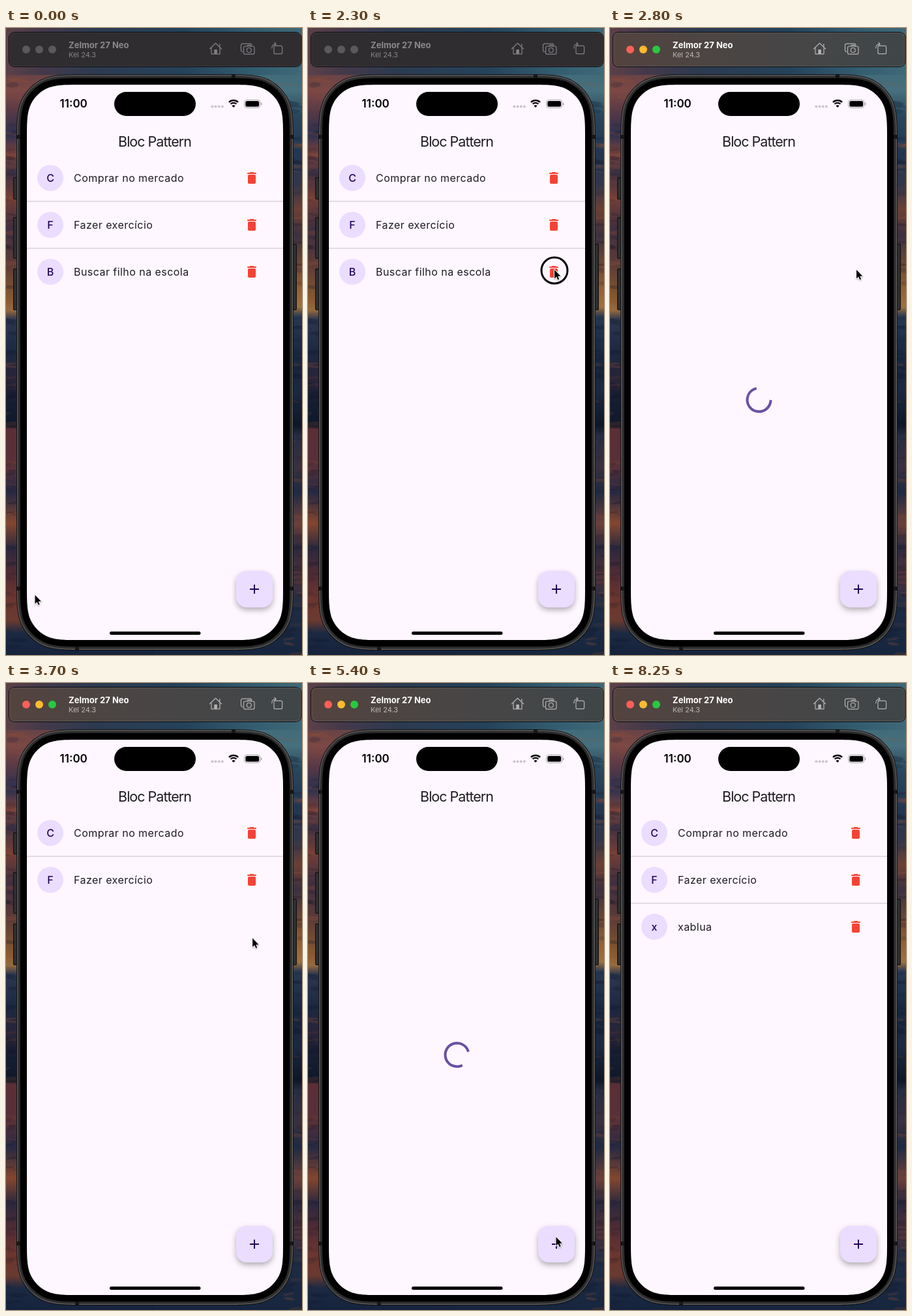
An HTML page with a canvas that plays this animation: 454x962 px, repeating every 8400 ms.

```html
<!DOCTYPE html>
<html lang="pt">
<head>
<meta charset="utf-8">
<title>Bloc Pattern</title>
<style>
html, body { margin: 0; width: 100%; height: 100%; overflow: hidden; background: #1a2236; }
canvas { display: block; width: 100vw; height: 100vh; }
</style>
</head>
<body>
<canvas id="stage" width="454" height="962"></canvas>
<script>
const W = 454, H = 962, LOOP = 8400, STEP = 100;
const canvas = document.getElementById('stage');
let ctx = canvas.getContext('2d');
const FONT = 'Inter, Roboto, sans-serif';

// Time of the main events, in ms
const ACTIVE = 2400, LOAD_MS = 1000;
const loads = [2375, 4710];
const clicks = [[2200, 2400], [4500, 4700]];

const tasks = ['Comprar no mercado', 'Fazer exercício'];

// Pointer keys: time, x, y
const pointer = [
  [0, 44.5, 870], [300, 44.5, 870], [1600, 378, 371], [3600, 378, 371],
  [4400, 380.5, 850], [6300, 380.5, 850], [6400, 380.5, 848],
  [6900, 380.5, 847.5], [7200, 166, 872], [7500, 166, 872], [8100, -16, 874]
];

const trash = new Path2D('M6 19c0 1.1.9 2 2 2h8c1.1 0 2-.9 2-2V9c0-1.1-.9-2-2-2H8c-1.1 0-2 .9-2 2v10z' +
  'M18 4h-2.5l-.71-.71c-.18-.18-.44-.29-.7-.29H9.91c-.26 0-.52.11-.7.29L8.5 4H6c-.55 0-1 .45-1 1s.45 1 1 1h12c.55 0 1-.45 1-1s-.45-1-1-1z');
const arrow = new Path2D('M0 0V13.4L3.1 10.6L5.1 15.2L7.2 14.3L5.2 9.8H9.5Z');

const clamp = v => Math.min(1, Math.max(0, v));
const smooth = v => v * v * (3 - 2 * v);

function seeded(seed) {
  return () => (seed = (seed * 16807) % 2147483647) / 2147483647;
}

function rect(x, y, w, h, r, fill) {
  ctx.beginPath();
  ctx.roundRect(x, y, w, h, r);
  if (fill) { ctx.fillStyle = fill; ctx.fill(); }
}

// Rectangle with continuous-curvature corners
function squircle(x, y, w, h, r, fill) {
  const corners = [[x + w, y, -1, 1, 0], [x + w, y + h, -1, -1, 1],
    [x, y + h, 1, -1, 0], [x, y, 1, 1, 1]];
  ctx.beginPath();
  for (const [cx, cy, sx, sy, swap] of corners) {
    const p = (a, b) => swap ? [cx + sx * b * r, cy + sy * a * r] : [cx + sx * a * r, cy + sy * b * r];
    ctx.lineTo(...p(1.5287, 0));
    ctx.bezierCurveTo(...p(1.0885, 0), ...p(.8684, 0), ...p(.6315, .0749));
    ctx.bezierCurveTo(...p(.3728, .1691), ...p(.1691, .3728), ...p(.0749, .6315));
    ctx.bezierCurveTo(...p(0, .8684), ...p(0, 1.0885), ...p(0, 1.5287));
  }
  ctx.fillStyle = fill;
  ctx.fill();
}

function disc(x, y, r, fill) {
  ctx.beginPath();
  ctx.arc(x, y, r, 0, Math.PI * 2);
  ctx.fillStyle = fill;
  ctx.fill();
}

function line(points) {
  ctx.beginPath();
  points.forEach(([x, y], i) => i ? ctx.lineTo(x, y) : ctx.moveTo(x, y));
  ctx.stroke();
}

function text(str, x, y, size, weight, fill, spacing = 0, align = 'left') {
  ctx.font = `${weight} ${size}px ${FONT}`;
  ctx.letterSpacing = spacing + 'px';
  ctx.textAlign = align;
  ctx.fillStyle = fill;
  ctx.fillText(str, x, y);
  ctx.letterSpacing = '0px';
}

function gradient(x0, y0, x1, y1, stops) {
  const g = ctx.createLinearGradient(x0, y0, x1, y1);
  stops.forEach(([p, c]) => g.addColorStop(p, c));
  return g;
}

function drawWallpaper() {
  const sides = [
    [0, [[0, '#43303c'], [.06, '#5c4048'], [.1, '#7c4844'], [.13, '#5c3a46'], [.17, '#2c3050'],
      [.2, '#80443c'], [.23, '#3a3044'], [.27, '#743e36'], [.32, '#402f40'], [.38, '#5e3c38'],
      [.43, '#86592f'], [.45, '#966a3e'], [.465, '#2c3650'], [.52, '#1c2741'], [.56, '#2a2438'],
      [.6, '#141d33'], [.633, '#10182a'], [.64, '#5c2e36'], [.7, '#56303a'], [.74, '#262842'],
      [.79, '#84462f'], [.83, '#2c283e'], [.87, '#502b34'], [.91, '#6c3530'], [.945, '#6a3a30'],
      [.965, '#1c2942'], [1, '#16233c']]],
    [W / 2, [[0, '#2f4a5c'], [.06, '#3f6878'], [.1, '#47707e'], [.14, '#28465c'], [.2, '#223652'],
      [.25, '#33364a'], [.29, '#6c4034'], [.33, '#3c3040'], [.38, '#724a34'], [.42, '#976434'],
      [.445, '#a0703e'], [.46, '#263852'], [.52, '#182840'], [.58, '#1a2840'], [.633, '#0e1728'],
      [.65, '#262c42'], [.7, '#3a3040'], [.74, '#1e2a42'], [.79, '#6c403a'], [.83, '#2a283e'],
      [.87, '#50323a'], [.92, '#1e2c44'], [1, '#16263e']]]
  ];
  for (const [x, stops] of sides) {
    ctx.fillStyle = gradient(0, 0, 0, H, stops);
    ctx.fillRect(x, 0, W / 2, H);
  }
  ctx.fillStyle = gradient(0, 0, W, 0, [[0, '#5c4048'], [.12, '#44394a'], [.3, '#2c3a50'],
    [.6, '#24425a'], [.85, '#345e70'], [1, '#3f6878']]);
  ctx.fillRect(0, 0, W, 72);

  // Cloud streaks
  const rnd = seeded(37);
  const tones = ['16,22,42', '150,78,50', '14,20,38'];
  for (let i = 0; i < 150; i++) {
    const x = (i % 2 ? W - 10 : 8) + (rnd() - .5) * 30;
    const y = 75 + rnd() * (H - 75);
    ctx.beginPath();
    ctx.ellipse(x, y, 8 + rnd() * 14, 1 + rnd() * 3, (rnd() - .5) * .4, 0, 7);
    ctx.fillStyle = `rgba(${tones[i % 3]},${.1 + rnd() * .2})`;
    ctx.fill();
  }
}

function drawPhone() {
  const buttons = [[11, 229, 34], [11, 290, 64], [11, 369, 64], [440, 331, 102]];
  for (const [x, y, h] of buttons) {
    rect(x, y, 6, h, 2, '#0d0d0e');
    rect(x + 1, y + 1, 4, h - 2, 1.5, '#302f31');
  }
  // Shells from the outer rim to the screen: distance from the screen edge, colour
  const shells = [[16, '#0b0b0c'], [15, '#6a696a'], [14, '#353536'], [12, '#282829'], [10, '#000'], [0, '#fef7ff']];
  for (const [d, fill] of shells) {
    squircle(32 - d, 87 - d, 393 + 2 * d, 852 + 2 * d, 55 + d, fill);
    if (d === 12) drawAntennas();
  }
}

function drawAntennas() {
  ctx.fillStyle = '#171718';
  for (const [x, y] of [[346, 72], [106, 949]]) ctx.fillRect(x, y, 6, 5);
  for (const y of [164, 857]) {
    ctx.fillRect(17, y, 5, 6);
    ctx.fillRect(435, y, 5, 6);
  }
}

function drawStatus() {
  text('11:00', 103.7, 122, 17, 600, '#000', 0, 'center');
  rect(166, 98, 125, 37, 18.5, '#000');
  for (let i = 0; i < 4; i++) disc(316.3 + i * 5.2, 120.6, 2, '#cbc5cc');

  ctx.strokeStyle = '#000';
  ctx.lineWidth = 2.3;
  for (const r of [10, 6.2]) {
    ctx.beginPath();
    ctx.arc(349, 121, r, -Math.PI * .75, -Math.PI * .25);
    ctx.stroke();
  }
  ctx.beginPath();
  ctx.moveTo(349, 122);
  ctx.arc(349, 122, 3.6, -Math.PI * .75, -Math.PI * .25);
  ctx.fillStyle = '#000';
  ctx.fill();

  rect(365.5, 110.3, 24.5, 12.2, 4);
  ctx.strokeStyle = '#a8a3a9';
  ctx.lineWidth = 1;
  ctx.stroke();
  rect(367.3, 112, 20.9, 8.8, 2.5, '#000');
  rect(391, 114.4, 1.4, 4, .7, '#a8a3a9');
}

function drawBar(active) {
  rect(4, 6, 449.5, 54, 9, '#09090b');
  rect(5, 7, 447.5, 52, 8, active ? '#686361' : '#454346');
  const fill = active
    ? gradient(5, 0, 453, 0, [[0, '#54433f'], [.3, '#4c4543'], [.65, '#464647'], [1, '#3f4648']])
    : '#2f2d30';
  rect(5.8, 7.8, 445.9, 50.4, 7.2, fill);
  const lights = active ? ['#ff5f57', '#febc2e', '#28c840'] : ['#5b595c', '#5b595c', '#5b595c'];
  lights.forEach((c, i) => disc(31 + i * 20, 33, 6, c));
  text('Zelmor 27 Neo', 96, 31, 13, 700, active ? '#fff' : '#8b898c');
  text('Kel 24.3', 96, 45, 11, 400, active ? '#bcb7b6' : '#87858a');

  const tone = active ? '#b6b2b1' : '#838185';
  ctx.strokeStyle = tone;
  ctx.lineWidth = 1.2;
  ctx.lineJoin = ctx.lineCap = 'round';
  // Home
  line([[312.5, 32], [321.5, 23.3], [330.5, 32]]);
  line([[315, 30.5], [315, 39.8], [328, 39.8], [328, 30.5]]);
  line([[327.8, 28.5], [327.8, 24.5]]);
  rect(319.3, 33, 4.6, 7, .8, tone);
  // Screenshot
  line([[363, 36.5], [361.5, 36.2], [360.5, 34.5], [360.5, 26], [362, 24.2], [375.5, 24.2], [377, 26]]);
  rect(364.5, 28, 16.5, 12.2, 2.5);
  ctx.stroke();
  line([[369.5, 28], [371, 26.3], [375, 26.3], [376.5, 28]]);
  ctx.beginPath();
  ctx.arc(372.8, 34, 3.5, 0, 7);
  ctx.stroke();
  // Rotate
  rect(411, 27.3, 12.6, 12.4, 2);
  ctx.stroke();
  ctx.beginPath();
  ctx.moveTo(407.8, 31);
  ctx.quadraticCurveTo(407.6, 24.8, 414, 24.6);
  ctx.stroke();
  line([[412, 22.5], [414.2, 24.6], [412, 26.8]]);
  ctx.lineCap = 'butt';
  ctx.lineJoin = 'miter';
}

function drawList(items) {
  items.forEach((name, i) => {
    const y = 230 + i * 72;
    disc(68, y, 20, '#eaddff');
    text(name[0], 68, y + 5.8, 16, 500, '#21005d', 0, 'center');
    text(name, 104, y + 5.8, 16, 400, '#1d1b20', .45);
    ctx.save();
    ctx.translate(365, y - 12);
    ctx.fillStyle = '#f44336';
    ctx.fill(trash);
    ctx.restore();
    if (i) {
      ctx.fillStyle = '#dcd5de';
      ctx.fillRect(32, y - 36.8, 393, 1.6);
    }
  });
}

// Material curve cubic-bezier(.4, 0, .2, 1)
function standardEase(x) {
  let lo = 0, hi = 1;
  for (let i = 0; i < 20; i++) {
    const s = (lo + hi) / 2, q = 1 - s;
    if (3 * q * q * s * .4 + 3 * q * s * s * .2 + s * s * s < x) lo = s; else hi = s;
  }
  return lo * lo * (3 - 2 * lo);
}

function drawSpinner(ms) {
  const cycle = (ms % 1333) / 1333, turn = (ms % 2222) / 2222;
  const head = standardEase(clamp(cycle * 2)), tail = standardEase(clamp(cycle * 2 - 1));
  const start = Math.PI * (-.5 + tail * 1.5 + turn * 2 + cycle * .5);
  const sweep = Math.max((head - tail) * 1.5 * Math.PI, .001);
  ctx.beginPath();
  ctx.arc(228.5, 570.5, 18, start, start + sweep);
  ctx.strokeStyle = '#6750a4';
  ctx.lineWidth = 4;
  ctx.lineCap = 'square';
  ctx.stroke();
  ctx.lineCap = 'butt';
}

function drawFab(t) {
  ctx.save();
  ctx.shadowColor = 'rgba(0,0,0,.3)';
  ctx.shadowBlur = 8;
  ctx.shadowOffsetY = 4;
  rect(353, 833, 56, 56, 16, '#eaddff');
  ctx.restore();

  const press = t - 4600;
  if (press >= 0 && press < 400) {
    const fade = 1 - clamp((press - 150) / 250);
    ctx.save();
    rect(353, 833, 56, 56, 16, `rgba(60,70,60,${.06 * fade})`);
    ctx.clip();
    disc(380, 853, 8 + press * .06 + Math.max(0, press - 100) * .12, `rgba(50,45,70,${.1 * fade})`);
    ctx.restore();
  }
  ctx.fillStyle = '#21005d';
  ctx.fillRect(374, 860, 14, 2);
  ctx.fillRect(380, 854, 2, 14);
}

function pointerAt(t) {
  let i = 1;
  while (i < pointer.length - 1 && pointer[i][0] < t) i++;
  const [t0, x0, y0] = pointer[i - 1], [t1, x1, y1] = pointer[i];
  const k = smooth(clamp((t - t0) / (t1 - t0)));
  return [x0 + (x1 - x0) * k, y0 + (y1 - y0) * k];
}

function drawPointer(t) {
  const [x, y] = pointerAt(t);
  if (clicks.some(([a, b]) => t >= a && t < b)) {
    ctx.beginPath();
    ctx.arc(x, y + 1, 20, 0, 7);
    ctx.strokeStyle = '#000';
    ctx.lineWidth = 3;
    ctx.stroke();
  }
  ctx.save();
  ctx.translate(x, y);
  ctx.shadowColor = 'rgba(0,0,0,.3)';
  ctx.shadowBlur = 2;
  ctx.shadowOffsetY = 1;
  ctx.strokeStyle = '#fff';
  ctx.lineWidth = 2;
  ctx.lineJoin = 'round';
  ctx.stroke(arrow);
  ctx.shadowColor = 'transparent';
  ctx.fillStyle = '#000';
  ctx.fill(arrow);
  ctx.restore();
}

function makeBackdrop() {
  const layer = document.createElement('canvas');
  layer.width = W;
  layer.height = H;
  const main = ctx;
  ctx = layer.getContext('2d');
  drawWallpaper();
  drawPhone();
  drawStatus();
  text('Bloc Pattern', 228, 182, 21.5, 400, '#1d1b20', -1, 'center');
  rect(159, 926, 139.5, 5, 2.5, '#000');
  ctx = main;
  return layer;
}

const backdrop = makeBackdrop();

function draw(t) {
  ctx.drawImage(backdrop, 0, 0);
  drawBar(t >= ACTIVE);
  const load = loads.find(s => t >= s && t < s + LOAD_MS);
  if (load !== undefined) drawSpinner(t - load);
  else if (t < loads[0]) drawList([...tasks, 'Buscar filho na escola']);
  else if (t < loads[1]) drawList(tasks);
  else drawList([...tasks, 'xablua']);
  drawFab(t);
  drawPointer(t);
}

function tick(now) {
  draw(Math.floor((now % LOOP) / STEP) * STEP);
  requestAnimationFrame(tick);
}
requestAnimationFrame(tick);
</script>
</body>
</html>
```
